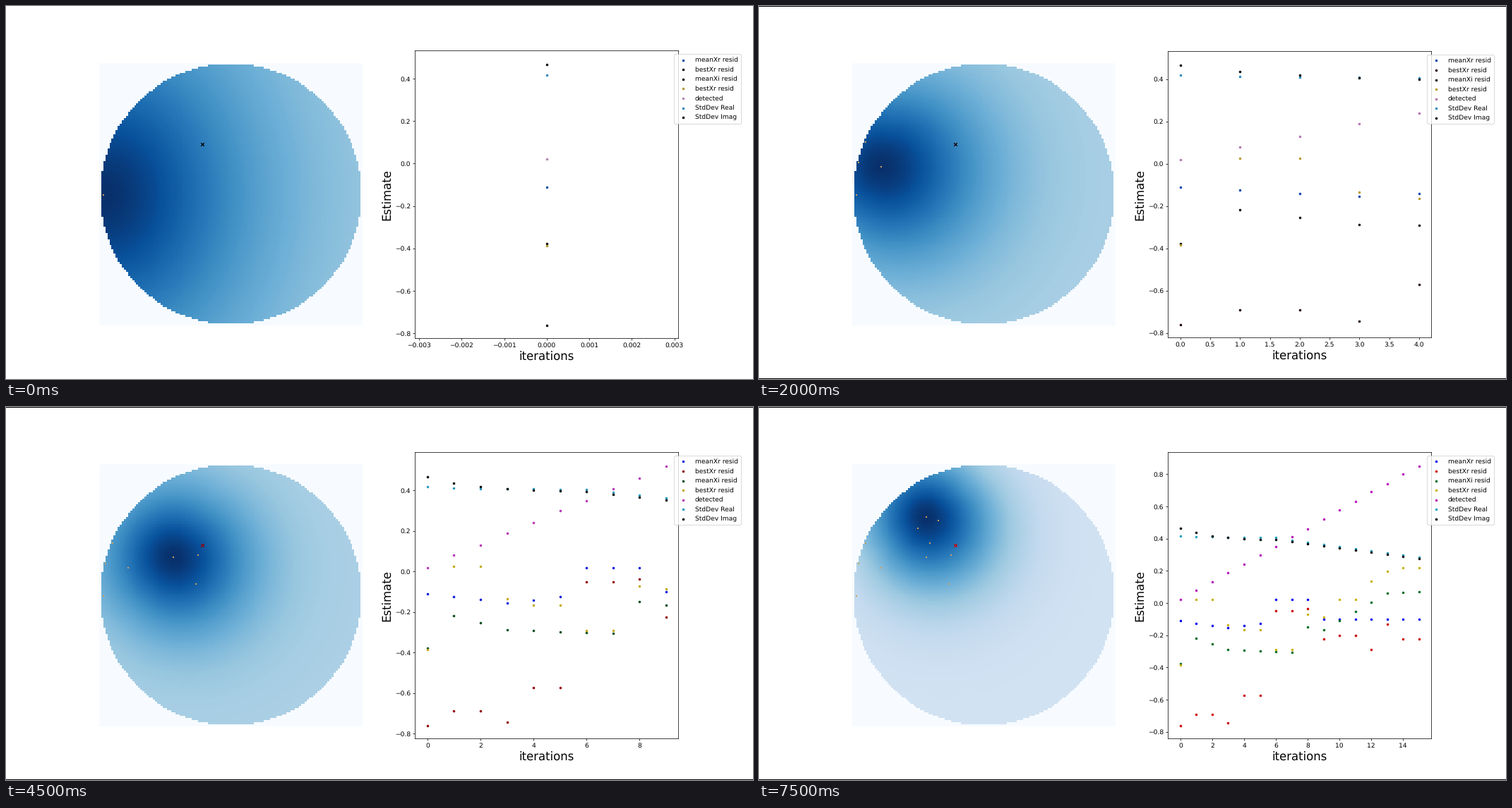
A matplotlib script for the animation above (8000 ms loop, 1058 by 529 pixels).

```python
import numpy as np
import matplotlib.pyplot as plt
from matplotlib.animation import FuncAnimation
from matplotlib.colors import to_rgb
from matplotlib.patches import Rectangle

plt.rcParams["text.hinting"] = "no_hinting"

STEPS = 16
N = 128
TRUTH = np.array([-0.217, 0.387])
steps = np.arange(STEPS)


def through(*points):
    """Straight segments through (step, value) points."""
    return np.interp(steps, *zip(*points))


# the best guess jumps at these steps: step, x residual, y residual
JUMPS = np.array([
    (0, -.761, -.386), (1, -.69, .024), (3, -.745, -.135), (4, -.573, -.165),
    (6, -.05, -.291), (8, -.036, -.071), (9, -.225, -.087), (10, -.2, .024),
    (12, -.289, .134), (13, -.13, .197), (14, -.225, .22),
])
best = JUMPS[np.searchsorted(JUMPS[:, 0], steps, side="right") - 1, 1:]
mean_x = through((0, -.11), (3, -.155), (5, -.126), (6, .02),
                 (8, .02), (9, -.1), (15, -.1))
mean_y = through((0, -.378), (1, -.219), (3, -.287), (7, -.307),
                 (8, -.15), (9, -.165), (13, .06), (15, .07))
detected = np.round(.02 + .0555 * steps, 2)
settle = np.exp(-steps / 2)
late = np.maximum(steps - 6, 0)
std_x = .405 + .013 * settle - .0135 * late
std_y = .39 + .076 * settle - .0125 * late

# label, values, first colour, last colour
SERIES = [
    ("meanXr resid", mean_x, "#0a4ea6", "#0000f0"),
    ("bestXr resid", best[:, 0], "#000000", "#cc0000"),
    ("meanXi resid", mean_y, "#000000", "#006a20"),
    ("bestXr resid", best[:, 1], "#b4962d", "#c8b010"),
    ("detected", detected, "#b280b0", "#b814b8"),
    ("StdDev Real", std_x, "#2e86c1", "#20a0c0"),
    ("StdDev Imag", std_y, "#000000", "#000000"),
]
values = np.array([row[1] for row in SERIES])
dots = TRUTH + best - [0, 1 / (N - 1)]
floors = through((0, .36), (3, .3), (6, .4), (15, .19))

axis = np.linspace(-1, 1, N)
X, Y = np.meshgrid(axis, -axis)
INSIDE = X**2 + Y**2 < 1
EDGE = N / (N - 1)


def blend(first, last, step):
    """Colours hold for three steps, then ease to their final tone."""
    t = np.sin(np.pi / 2 * np.clip((step - 3) / 12, 0, 1))
    return tuple((1 - t) * np.array(to_rgb(first)) + t * np.array(to_rgb(last)))


def field(step):
    """Peak at the best guess, narrowing with time, longer toward the centre."""
    cx, cy = dots[step]
    dx, dy = X - cx, Y - cy
    r = np.hypot(dx, dy / (1 + .35 * np.exp(-step)))
    inward = np.maximum(-(dx * cx + dy * cy) / (np.hypot(dx, dy) + 1e-9), 0)
    width = (.43 + .42 * np.exp(-step / 5)) * (1 + .3 * inward)
    peak = np.exp(-(r / width)**1.7)
    floor = floors[step]
    return np.where(INSIDE, floor + (1 - floor) * peak, 0)


fig = plt.figure(figsize=(16, 8), dpi=66.125)
WIDE = .775 / 2.2
PX = 1 / 529
disk = fig.add_axes((.125, .495 - WIDE, WIDE, 2 * WIDE))
plot = fig.add_axes((.9 - WIDE, .11, WIDE, .77))
rules = [fig.add_artist(Rectangle((0, y), 1, PX, color="black", lw=0,
                                  transform=fig.transFigure))
         for y in (0, 1 - PX)]


def draw_disk(step):
    disk.clear()
    disk.axis("off")
    disk.imshow(field(step), cmap="Blues", vmin=0, vmax=1, aspect="auto",
                interpolation="nearest", extent=(-EDGE, EDGE, -EDGE, EDGE))
    disk.scatter(*TRUTH, s=25, marker="x", lw=1.4, zorder=3,
                 color=blend("#000000", "#cc0000", step))
    disk.scatter(*dots[:step + 1].T, s=2, marker="s", lw=0,
                 color="#d0a055", zorder=4)


def draw_plot(step):
    plot.clear()
    n = step + 1
    for label, data, first, last in SERIES:
        plot.scatter(steps[:n], data[:n], s=8, label=label,
                     color=[blend(first, last, step)])
    low, high = values[:, :n].min(), values[:, :n].max()
    span = high - low
    plot.set_ylim(low - .0495 * span, high + .0535 * span)
    pad = .0515 * step or .00309
    plot.set_xlim(-pad, step + pad)
    plot.set_xlabel("iterations", fontsize=18)
    plot.set_ylabel("Estimate", fontsize=18, labelpad=2.5)
    plot.legend(loc="upper right", bbox_to_anchor=(1.25, 1),
                labelspacing=.53, borderpad=.45)


def draw(step):
    # the rules take one pixel above and below the chart
    inset = PX if step else 0
    scale = 1 - 2 * inset
    plot.set_position((.9 - WIDE, inset + .11 * scale, WIDE, .77 * scale))
    for rule in rules:
        rule.set_visible(step > 0)
    draw_disk(step)
    draw_plot(step)
    return []


anim = FuncAnimation(fig, draw, frames=STEPS, interval=500, repeat=True,
                     repeat_delay=0, blit=False)
plt.show()
```
